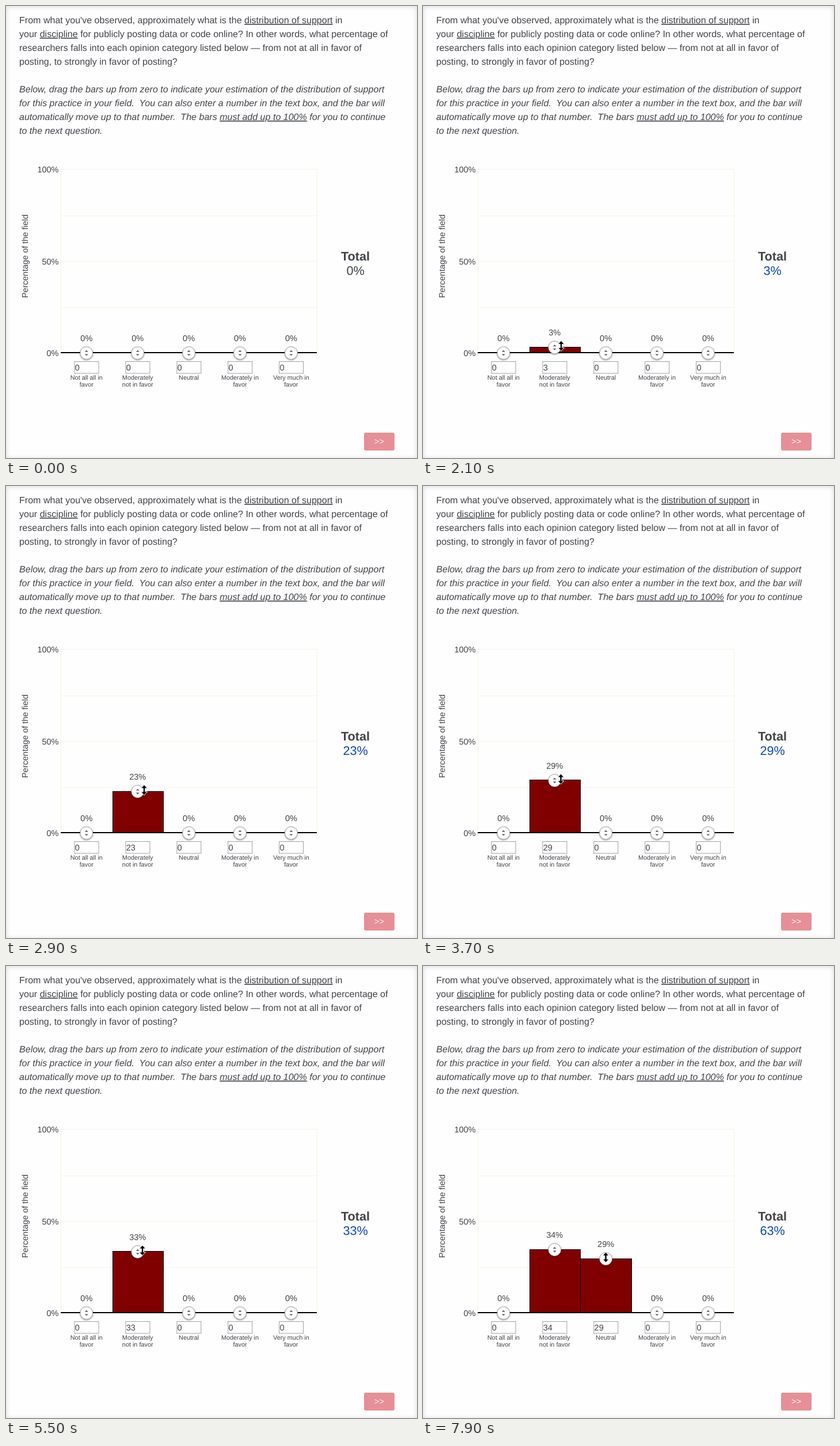
An HTML page for the animation above (8000 ms loop, 714 px wide and 785 px high).

```html
<!DOCTYPE html>
<html lang="en">
<head>
<meta charset="utf-8">
<title>Distribution of support</title>
<style>
html, body { margin: 0; width: 100%; height: 100%; overflow: hidden; background: #fff; }
svg { display: block; width: 100%; height: 100%; background: #fefefe; box-shadow: inset 0 1px 9px #d8d8d8; }
text { font-family: "Liberation Sans", Arial, sans-serif; font-size: 14.5px; fill: #414349; text-rendering: geometricPrecision; }
.question text { font-size: 16.06px; }
.question tspan { text-decoration: underline; }
.mid { text-anchor: middle; }
.end { text-anchor: end; }
.small { font-size: 10.85px; }
.big { font-size: 21.6px; }
.knob { filter: drop-shadow(0 1px 1.5px #0007); }
</style>
</head>
<body>
<svg viewBox="0 0 714 785">
  <g class="question">
    <text x="23" y="30">From what you've observed, approximately what is the <tspan>distribution of support</tspan> in</text>
    <text x="23" y="54">your <tspan>discipline</tspan> for publicly posting data or code online? In other words, what percentage of</text>
    <text x="23" y="78">researchers falls into each opinion category listed below — from not at all in favor of</text>
    <text x="23" y="102">posting, to strongly in favor of posting?</text>
    <g font-style="italic">
      <text x="23" y="150">Below, drag the bars up from zero to indicate your estimation of the distribution of support</text>
      <text x="23" y="174">for this practice in your field.&nbsp; You can also enter a number in the text box, and the bar will</text>
      <text x="23" y="198">automatically move up to that number.&nbsp; The bars <tspan>must add up to 100%</tspan> for you to continue</text>
      <text x="23" y="222">to the next question.</text>
    </g>
  </g>
  <path d="M95.5 602V283.5H540.5V602M95 364.5H540M95 443.5H540M95 523.5H540" fill="none" stroke="#f7f3e3"/>
  <text class="end" x="91.5" y="289">100%</text>
  <text class="end" x="91.5" y="448.5">50%</text>
  <text class="end" x="91.5" y="608">0%</text>
  <text class="mid" transform="translate(37.5 434.5) rotate(-90)">Percentage of the field</text>
  <text class="mid big" x="607" y="441.7" font-weight="bold">Total</text>
  <text class="mid big" x="607" y="467" id="total"></text>
  <g id="bars"></g>
  <path d="M95 602H540" stroke="#000" stroke-width="2"/>
  <g id="columns"></g>
  <rect x="622" y="741" width="53" height="31" rx="3" fill="#e78f98"/>
  <text class="mid" x="648.5" y="761" style="fill:#fff">&gt;&gt;</text>
  <g id="cursor" stroke="#fff" stroke-linejoin="round">
    <path id="arrow" d="M0 0V14.5L3.5 11.5L6 17L8.6 15.8L6.2 10.5H10.8Z"/>
    <path id="resize" d="M0-9L5.5-3H1.7V3H5.5L0 9L-5.5 3H-1.7V-3H-5.5Z"/>
  </g>
</svg>
<script>
const LOOP = 8000, STEP = 100, ZERO_Y = 602, PERCENT = 3.195;
const names = [["Not all all in", "favor"], ["Moderately", "not in favor"], ["Neutral"],
  ["Moderately in", "favor"], ["Very much in", "favor"]];

const $ = id => document.getElementById(id);
const all = selector => [...document.querySelectorAll(selector)];
const crisp = v => Math.floor(v) + 0.5;
const centre = i => 139.8 + 88.9 * i;
const edge = i => crisp(96.5 + 88.7 * i);

// Ease-out from 0 to 1 between two times
const ease = (t, from, to, power = 1.45) =>
  1 - (1 - Math.min(1, Math.max(0, (t - from) / (to - from)))) ** power;

// The second bar is dragged three times, the third bar once
const secondBar = t => 27.5 * ease(t, 2000, 3300) + 5.7 * ease(t, 3600, 4400) + 1.2 * ease(t, 6000, 6200);
const thirdBar = t => 29.4 * ease(t, 7300, 7900);
const barValues = t => [0, secondBar(t), thirdBar(t), 0, 0];

// The cursor enters, rises with the bar, then drops to the next handle
function cursorAt(t) {
  const x = 609 - 369 * ease(t, 600, 1400, 3) - 3 * ease(t, 3600, 4400) + 80.5 * ease(t, 6600, 7200, 2);
  const lift = secondBar(t) * (1 - ease(t, 6600, 7200, 1.7)) + thirdBar(t);
  return [x, 337 + 263 * ease(t, 600, 1400) - lift * PERCENT];
}

$("bars").innerHTML = names.map((_, i) =>
  `<rect x="${edge(i)}" width="${edge(i + 1) - edge(i)}" fill="#800000" stroke="#000"/>`).join("");
$("columns").innerHTML = names.map((lines, i) => `<g transform="translate(${centre(i)} 0)">
  <g class="handle">
    <text class="mid value" y="-21"></text>
    <circle class="knob" r="10.8" fill="#fff" stroke="#aaa"/>
    <path d="M-3-1.8L0-5L3-1.8ZM-3 1.8L0 5L3 1.8Z" fill="#666"/>
  </g>
  <rect x="-20.8" y="617.5" width="42" height="20.5" fill="#fff" stroke="#a0a0a0"/>
  <text class="entry" x="-20" y="633"></text>
  ${lines.map((s, n) => `<text class="mid small" y="${648.8 + 12.5 * n}">${s}</text>`).join("")}
</g>`).join("");

const rects = all("#bars rect"), handles = all(".handle"), labels = all(".value"), entries = all(".entry");

function draw(t) {
  const [x, y] = cursorAt(t);
  let total = 0, overHandle = false;
  barValues(t).forEach((value, i) => {
    const shown = Math.round(value), top = ZERO_Y - value * PERCENT;
    total += shown;
    overHandle ||= Math.hypot(x - centre(i), y - top) < 14;
    rects[i].setAttribute("y", crisp(top));
    rects[i].setAttribute("height", ZERO_Y + 0.5 - crisp(top));
    rects[i].style.display = value ? "" : "none";
    handles[i].setAttribute("transform", `translate(0 ${top + 0.6})`);
    labels[i].textContent = shown + "%";
    entries[i].textContent = shown;
  });
  $("total").textContent = total + "%";
  $("total").style.fill = total ? "#0b47c1" : "";
  $("cursor").setAttribute("transform", `translate(${x} ${y})`);
  $("cursor").style.display = t < 600 ? "none" : "";
  $("arrow").style.display = overHandle ? "none" : "";
  $("resize").style.display = overHandle ? "" : "none";
}

const start = performance.now();
function tick() {
  const t = (performance.now() - start) % LOOP;
  draw(Math.floor(t / STEP) * STEP);
  requestAnimationFrame(tick);
}
tick();
</script>
</body>
</html>
```
